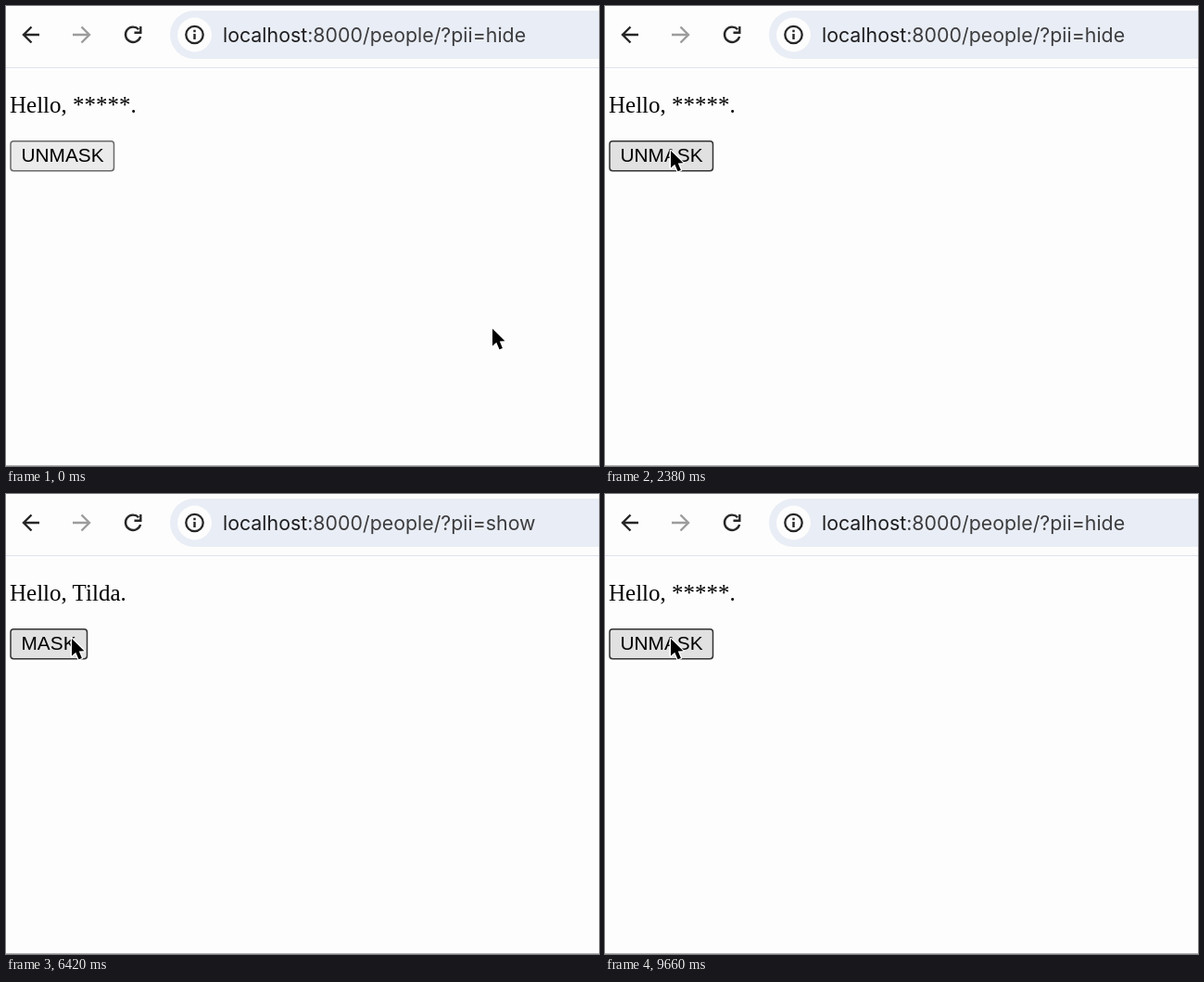
Recreate the animation shown at these times as an HTML page. Size 640 by 496 pixels, loop 9680 ms.

```html
<!DOCTYPE html>
<html lang="en">
<head>
<meta charset="utf-8">
<title>Masked greeting</title>
<style>
  html, body { margin: 0; width: 100%; height: 100%; overflow: hidden; background: #fdfdfd; }
  svg { display: block; width: 100vw; height: 100vh; }
  .icon { fill: none; stroke: #262626; stroke-width: 2.4; }
  .url { font: 21.35px Inter, "Open Sans", sans-serif; fill: #3c3c3e; }
  .host { fill: #1d1d1f; }
  .hello { font: 25px "Liberation Serif", serif; }
  .label { font: 20.83px "Liberation Sans", sans-serif; }
</style>
</head>
<body>
<svg viewBox="0 0 640 496">
  <rect width="640" height="496" fill="#fdfdfd"/>

  <path class="icon" d="M36 31H19.5M27.5 22.5L19 31L27.5 39.5"/>
  <path class="icon" style="stroke:#9c9c9c" d="M72 31H89.5M81.5 22.5L90 31L81.5 39.5"/>
  <path class="icon" d="M143.2 25.2A8.2 8.2 0 1 0 145.1 33M145.3 22V28.8H138.5"/>

  <rect x="177" y="5" width="500" height="52" rx="26" fill="#e9edf5"/>
  <circle cx="203.5" cy="31" r="18.5" fill="#fdfdfd"/>
  <circle class="icon" cx="203.5" cy="31" r="9.2" style="stroke-width:2.3"/>
  <path class="icon" d="M203.5 30V36M203.5 25.7V28.2"/>
  <text class="url" x="234" y="38.5"><tspan class="host">localhost</tspan>:8000/people/?pii=<tspan id="mode">hide</tspan></text>

  <path d="M0 66.5H640" stroke="#dde2f0"/>
  <path d="M0 495.5H640" stroke="#b2b2b2"/>

  <text class="hello" x="4" y="115">Hello, <tspan id="name">*****</tspan>.</text>
  <rect id="button" x="5" y="145.7" height="32" rx="3.2" stroke-width="1.5"/>
  <text class="label" id="label" x="16.5" y="168"></text>

  <circle id="ring" cx="71.5" cy="157.5" fill="none" stroke="#000" stroke-width="2"/>
  <path id="cursor" d="M0 0V18.6L4.3 14.7L7.5 22.3L10.9 20.9L7.8 13.6L13.4 13.3Z"
    fill="#000" stroke="#fff" stroke-width="2.6" paint-order="stroke" stroke-linejoin="round"/>
</svg>
<script>
const LOOP = 9680;
const $ = id => document.getElementById(id);
const [mode, person, button, label, ring, cursor] =
  ["mode", "name", "button", "label", "ring", "cursor"].map($);

// time, x, y
const path = [
  [350, 525, 348], [1000, 205, 250], [1450, 62, 207],
  [1700, 52, 203], [1980, 62, 182], [2350, 71, 156]
];
const clicks = [[3780, 3960], [7680, 7900]];
const shown = [4020, 8020];

const clamp = v => Math.max(0, Math.min(1, v));

function cursorAt(t) {
  const last = path.length - 1;
  if (t <= path[0][0]) return path[0].slice(1);
  if (t >= path[last][0]) return path[last].slice(1);
  const i = path.findIndex(p => p[0] > t) - 1;
  const a = path[i], b = path[i + 1];
  let k = (t - a[0]) / (b[0] - a[0]);
  if (i === 0) k *= k * (1.6 - 0.6 * k);
  if (i === last - 1) k = 1 - (1 - k) ** 2;
  return [a[1] + (b[1] - a[1]) * k, a[2] + (b[2] - a[2]) * k];
}

function draw(t) {
  const [x, y] = cursorAt(t);
  cursor.setAttribute("transform", `translate(${x} ${y})`);

  const open = t >= shown[0] && t < shown[1];
  mode.textContent = open ? "show" : "hide";
  person.textContent = open ? "Tilda" : "*****";
  label.textContent = open ? "MASK" : "UNMASK";

  const width = open ? 82.5 : 111.5;
  const hover = y < 178 && y > 145 && x < 5 + width;
  button.setAttribute("width", width);
  button.setAttribute("fill", hover ? "#e1e1e1" : "#ebebeb");
  button.setAttribute("stroke", hover ? "#333" : "#6a6a6a");

  const press = Math.max(...clicks.map(([down, up]) =>
    Math.min(clamp((t - down) / 40), clamp((up + 60 - t) / 60))));
  ring.setAttribute("r", 24 + 9 * press);
  ring.setAttribute("opacity", press);
}

const start = performance.now();
function tick() {
  draw((performance.now() - start) % LOOP);
  requestAnimationFrame(tick);
}
tick();
</script>
</body>
</html>
```
